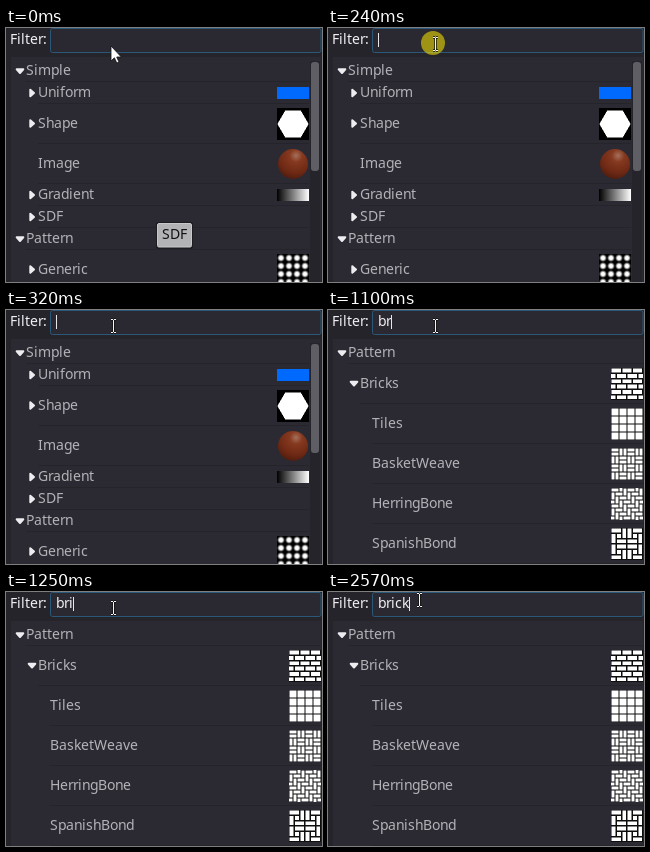
These frames come from a looping animation (316x254 px, 2640 ms). An HTML page with a canvas:

```html
<!DOCTYPE html>
<html lang="en">
<head>
<meta charset="utf-8">
<title>Library filter</title>
<style>
  html, body { margin: 0; width: 100%; height: 100%; overflow: hidden; background: #25242b; }
  #stage { position: relative; width: 316px; height: 254px; overflow: hidden; }
  #stage > *, .scene > * { position: absolute; left: 0; top: 0; }
  .scene { width: 316px; height: 254px; }
  svg { display: block; overflow: hidden; }
  text { font: 14px "Noto Sans", "Open Sans", sans-serif; fill: #b3b2b7; }
  .bright { fill: #f0f0f2; }
</style>
</head>
<body>
<div id="stage"></div>
<script>
(() => {
const LOOP = 2640, W = 316, H = 254;
const stage = document.getElementById('stage');

function add(parent, tag, attrs = {}) {
  const node = document.createElementNS('http://www.w3.org/2000/svg', tag);
  for (const k in attrs) node.setAttribute(k, attrs[k]);
  return parent.appendChild(node);
}
const layer = parent => add(parent, 'svg', { width: W, height: H, viewBox: `0 0 ${W} ${H}` });
const rect = (parent, x, y, width, height, fill, more = {}) =>
  add(parent, 'rect', { x, y, width, height, fill, ...more });

// Whole-pixel letter advances, as in a hinted interface font
const ruler = document.createElement('canvas').getContext('2d');
ruler.font = '140px "Noto Sans", "Open Sans", sans-serif';
const fixed = { r: 5, i: 4, l: 4 };
const advance = c => fixed[c] || Math.floor(ruler.measureText(c).width / 10 + 0.32);
const textWidth = s => [...s].reduce((sum, c) => sum + advance(c), 0);
function setText(node, x, s) {
  node.setAttribute('x', [...s].map((c, i) => x + textWidth(s.slice(0, i))).join(' '));
  node.textContent = s;
}
function label(parent, x, y, s, attrs = {}) {
  const node = add(parent, 'text', { y, ...attrs });
  setText(node, x, s);
  return node;
}

// Thumbnail shaders: (x, y) in 0..32 gives a grey from 0 to 1
const { hypot, abs, floor, min, max } = Math;
const mod = (a, n) => ((a % n) + n) % n;
const boxDist = (x, y, w, h) => hypot(max(abs(x) - w, 0), max(abs(y) - h, 0));
const field = (dist, gain) => (x, y) => dist(x / 32 - 0.5, y / 32 - 0.5) * gain;

// White bricks with dark joints centred on the lines where the brick id changes
const bricks = (id, gap) => (x, y) => {
  const g = gap / 2;
  return id(x - g, y) === id(x + g, y) && id(x, y - g) === id(x, y + g) ? 1 : 0.05;
};
function runningId(x, y) {
  const row = floor(y * 6 / 32);
  return row + ':' + floor(x * 3 / 32 + mod(row, 2) / 2);
}
function basketId(x, y) {
  const i = floor(x / 8), j = floor(y / 8);
  const across = mod(i + j, 2) ? x : y;
  return i + ':' + j + ':' + floor(mod(across, 8) / 4);
}
function herringId(x, y) {
  const i = floor(x / 4), j = floor(y / 4), k = mod(i - j, 4);
  if (k < 2) return 'h' + (i - k) + ':' + j;
  return 'v' + i + ':' + (k === 3 ? j : j - 1);
}
function pinwheelId(x, y) {
  const cx = floor(x / 16), cy = floor(y / 16);
  const j = floor(mod(y, 16) * 3 / 16);
  let i = floor(mod(x, 16) * 3 / 16);
  if (mod(cx + cy, 2)) i = 2 - i;
  return cx + ':' + cy + ['aab', 'dcb', 'dee'][j][i];
}

const shade = {
  hexagon: (x, y) => {
    const u = abs(x - 16), v = abs(y - 16);
    return v < 13.5 && u * 0.866 + v * 0.5 < 13.5 ? 1 : 0;
  },
  dots: (x, y) => max(0, min(1, 1.75 - hypot(mod(x, 8) - 4, mod(y, 8) - 4) * 0.45)),
  box: field((x, y) => boxDist(x, y, 0.32, 0.3), 1.6),
  rhombus: field((x, y) => (abs(x) * 0.3 + abs(y) * 0.45 - 0.135) / 0.541, 1.2),
  union: field((x, y) => min(hypot(x, y + 0.18) - 0.29, boxDist(x, y - 0.3, 0.38, 0.26)), 1.4),
  running: bricks(runningId, 1.5),
  tiles: bricks((x, y) => floor(x / 8) + ':' + floor(y / 8), 1),
  basket: bricks(basketId, 1),
  herring: bricks(herringId, 1),
  pinwheel: bricks(pinwheelId, 1.5)
};
const swatch = {
  blue: 'background:#006aff;height:12px',
  ramp: 'background:linear-gradient(90deg,#000,#fff);height:12px',
  ball: 'background:radial-gradient(circle at 60% 22%,#a5705a,#85391f 22%,#6d2814 60%,#35130a);' +
        'height:30px;border-radius:50%'
};

function thumb(scene, kind, x, y, h) {
  let node, width = 32;
  if (swatch[kind]) {
    node = document.createElement('div');
    node.style.cssText = swatch[kind];
    if (kind === 'ball') { x += 1; width = 30; }
  } else {
    node = document.createElement('canvas');
    const n = node.width = node.height = 64;
    const ctx = node.getContext('2d'), img = ctx.createImageData(n, n);
    for (let p = 0; p < n * n; p++) {
      const g = 255 * shade[kind]((p % n + 0.5) / 2, (floor(p / n) + 0.5) / 2);
      img.data.set([g, g, g, 255], p * 4);
    }
    ctx.putImageData(img, 0, 0);
    node.style.height = '32px';
  }
  node.style.width = width + 'px';
  node.style.left = x + 'px';
  node.style.top = y + (h - parseInt(node.style.height)) / 2 + 'px';
  scene.append(node);
}

// Rows: level, name, fold arrow (v open, > closed), thumbnail
function tree(rows, grip) {
  const scene = document.createElement('div');
  scene.className = 'scene';
  stage.append(scene);
  const svg = layer(scene), right = grip ? 303 : 315;
  let y = 32;
  for (const [level, name, fold, kind] of rows) {
    const tall = kind && !['blue', 'ramp'].includes(kind);
    const h = tall ? 40 : 22, x = 20 + level * 12;
    label(svg, x, y + (tall ? 24 : 15), name);
    rect(svg, x, y + h - 1, right - x, 1, '#25242b');
    if (fold) add(svg, 'path', {
      d: fold === 'v' ? 'M-3.3-1.7H3.3L0 2Z' : 'M-1.7-3.3V3.3L2 0Z',
      transform: `translate(${x - 6} ${y + h / 2 - (tall ? 0.5 : 0)})`,
      fill: '#ededf0', stroke: '#ededf0', 'stroke-width': 2, 'stroke-linejoin': 'round'
    });
    if (kind) thumb(scene, kind, right - 32, y, h);
    y += h;
  }
  if (grip) {
    rect(svg, 304, 33, 10, 221, '#25242b');
    rect(svg, 305, 34, 8, grip, '#5f5e65', { rx: 3 });
  }
  return scene;
}

const base = layer(stage);
rect(base, 0, 0, W, H, '#25242b');
rect(base, 44.5, 0.5, 270.5, 24, '#2a2932', { rx: 2, stroke: '#2b5878' });
rect(base, 5, 29, 310, 225, '#2b2a33');
label(base, 4, 16, 'Filter:', { class: 'bright' });

const scenes = [
  tree([
    [0, 'Simple', 'v'], [1, 'Uniform', '>', 'blue'], [1, 'Shape', '>', 'hexagon'],
    [1, 'Image', '', 'ball'], [1, 'Gradient', '>', 'ramp'], [1, 'SDF', '>'],
    [0, 'Pattern', 'v'], [1, 'Generic', '>', 'dots']
  ], 109),
  tree([
    [0, 'Simple', 'v'], [1, 'SDF', 'v'], [2, 'Shapes', 'v'], [3, 'sdBox', '', 'box'],
    [3, 'sdRhombus', '', 'rhombus'], [2, 'Operators', 'v'], [3, 'sdBoolean', '', 'union'],
    [3, 'sdSmoothBoolean', '', 'union']
  ], 145),
  tree([
    [0, 'Pattern', 'v'], [1, 'Bricks', 'v', 'running'], [2, 'Tiles', '', 'tiles'],
    [2, 'BasketWeave', '', 'basket'], [2, 'HerringBone', '', 'herring'],
    [2, 'SpanishBond', '', 'pinwheel']
  ])
];

const overlay = layer(stage);
const query = label(overlay, 50, 16, '', { class: 'bright' });
const caret = rect(overlay, 50, 5, 1, 14, '#e6e6e8');
const tip = add(overlay, 'g');
rect(tip, 150, 194, 37, 27, '#1d1c21', { rx: 2 });
rect(tip, 151.5, 195.5, 34, 23.5, '#b3b3b5', { rx: 1.5, stroke: '#c9c9cb' });
label(tip, 156, 211, 'SDF', { style: 'fill:#111' });
const click = add(overlay, 'circle', { cx: 105, cy: 15, r: 12, fill: '#ffeb00', 'fill-opacity': 0.55 });
const arrow = add(overlay, 'path', {
  d: 'M105 18V33L108.4 29.8 110.8 35 113 34 110.7 29H115.3Z',
  fill: '#fff', stroke: '#111', 'stroke-width': 0.8
});
const beam = add(overlay, 'g', { fill: 'none' });
for (const [stroke, width] of [['#111', 2.4], ['#f4f4f4', 1]])
  add(beam, 'path', {
    d: 'M105 9.5H107M108 9.5H110M107.5 10V22M105 22.5H107M108 22.5H110',
    stroke, 'stroke-width': width
  });

const keys = [1010, 1100, 1250, 1480, 1560];
const show = (node, on) => { node.style.display = on ? '' : 'none'; };

function draw(t) {
  const typed = 'brick'.slice(0, keys.filter(k => t >= k).length);
  const page = min(typed.length, 2);
  scenes.forEach((scene, i) => show(scene, i === page));
  setText(query, 50, typed);
  caret.setAttribute('x', 50 + textWidth(typed));
  show(caret, t >= 240);
  show(tip, t < 240);
  show(arrow, t < 240);
  arrow.setAttribute('transform', t < 90 ? 'translate(0 0)' : 'translate(1 -2)');
  show(click, t >= 240 && t < 320);
  show(beam, t >= 240);
  beam.setAttribute('transform', t < 2570 ? 'translate(0 0)' : 'translate(-16 -8)');
}

const start = performance.now();
function tick() {
  draw((performance.now() - start) % LOOP);
  requestAnimationFrame(tick);
}
tick();
})();
</script>
</body>
</html>
```
